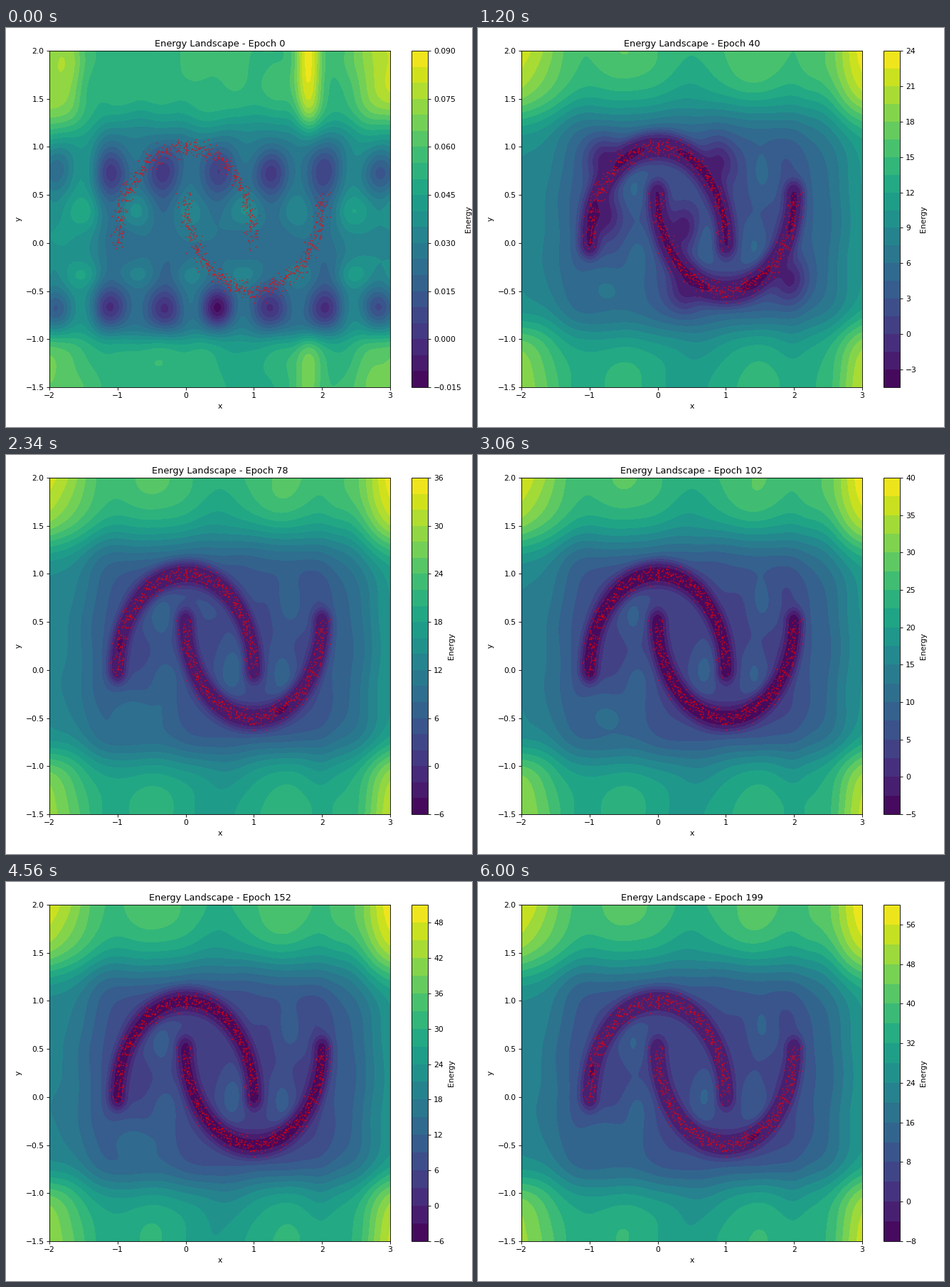
These frames come from a looping animation (655 by 562 pixels, 6.06 s). A matplotlib script:

```python
import numpy as np
import matplotlib.pyplot as plt
from matplotlib.animation import FuncAnimation

W, H, DPI = 655, 562, 72
FRAMES, STEP = 101, 60
ZOOM = 1.07  # text and line size relative to the defaults

plt.rcParams["font.family"] = "DejaVu Sans"
for key in ("font.size", "axes.linewidth", "axes.titlepad", "axes.labelpad",
            "xtick.major.size", "xtick.major.width", "xtick.major.pad",
            "ytick.major.size", "ytick.major.width", "ytick.major.pad"):
    plt.rcParams[key] *= ZOOM

# Highest energy at a few epochs
PEAK_EPOCHS = [0, 15, 40, 78, 102, 134, 170, 199]
PEAKS = [0, 7, 23.2, 35, 39.4, 47, 53.4, 59.55]

# Places that stay high, that sink early on, and the deepest spots
HILLS = [(-0.35, 0.52), (-0.3, -0.15), (0.68, 0), (1.42, 0), (1.52, 0.75)]
POOLS = [(0.38, 0.15), (-0.8, 0.88), (0.9, 0.85),
         (-0.8, 0.3), (0.4, -0.48), (1.95, -0.38)]
SPOTS = [(-0.96, 0.28), (1.4, -0.42)]


def gauss(v, spread):
    return np.exp(-(v / spread) ** 2 / 2)


def sigmoid(v):
    return 1 / (1 + np.exp(-v))


def bumps(points, height, sx, sy):
    return height * sum(gauss(X - x, sx) * gauss(Y - y, sy) for x, y in points)


def waves(seed, height, pitch, count=8):
    """Gentle irregular ripple."""
    rng = np.random.RandomState(seed)
    total = 0
    for _ in range(count):
        kx, ky = rng.normal(scale=pitch, size=2)
        total = total + np.sin(kx * X + ky * Y + rng.uniform(0, 2 * np.pi))
    return height * total / np.sqrt(count)


def arc_distance(cx, cy, side):
    """Distance to a unit half circle that opens down (1) or up (-1)."""
    dx, dy = X - cx, (Y - cy) * side
    return np.where(dy >= 0, np.abs(np.hypot(dx, dy) - 1),
                    np.hypot(np.abs(dx) - 1, dy))


def make_moons(n=1000, noise=0.05, seed=42):
    rng = np.random.RandomState(seed)
    t = np.linspace(0, np.pi, n // 2)
    pts = np.vstack([np.c_[np.cos(t), np.sin(t)],
                     np.c_[1 - np.cos(t), 0.5 - np.sin(t)]])
    order = np.arange(n)
    rng.shuffle(order)
    return pts[order] + rng.normal(scale=noise, size=pts.shape)


def start_field():
    """Untrained landscape: two rows of wells between high bands."""
    top, low = sigmoid((Y - 1.23) / 0.12), sigmoid((-0.98 - Y) / 0.07)
    well = 0.5 + 0.5 * np.cos(2 * np.pi * (X - 0.47) / 0.79)
    left, right = sigmoid((-1.3 - X) / 0.07), sigmoid((X - 2.3) / 0.1)
    z = 23 + 30 * (top + low) + (13 * left + 10 * right) * (1 - top - low)
    z -= 18 * well * gauss(Y - 0.74, 0.18)
    z -= (22 + 12 * gauss(X - 0.47, 0.35)) * well * gauss(Y + 0.68, 0.15)
    z += (1 - well) * (12 * gauss(Y - 0.33, 0.14) + 8 * gauss(Y + 0.33, 0.09))
    z += (top + 0.45 * low) * (30 * gauss(X - 1.8, 0.13)
                               + 26 * sigmoid((X - 2.6) / 0.12)
                               + 18 * sigmoid((-1.6 - X) / 0.08))
    z -= 8 * low * gauss(X - 0.8, 0.4)
    z += waves(3, 1.8, 6)
    z = (z - z.min()) / (z.max() - z.min())
    return -0.0125 + 0.1 * z


def trained_hills():
    """Bowl around the data, scaled to a height of one."""
    top, low = sigmoid((Y - 1.36) / 0.15), sigmoid((-0.88 - Y) / 0.12)
    z = 6 + 32 * top + 26 * low + 16 * sigmoid((-1.4 - X) / 0.18)
    z += 5 * sigmoid((X - 2.1) / 0.08) + 17 * sigmoid((X - 2.7) / 0.15)
    z += 3.5 * (top + low) * np.cos(2 * np.pi * (X - 1.45) / 1.9)
    z += bumps(HILLS, 6, 0.14, 0.19) + bumps([(-0.7, -0.45)], 8, 0.35, 0.18)
    z += waves(5, 0.6, 6)
    return z / z.max()


gx, gy = np.linspace(-2, 3, 120), np.linspace(-1.5, 2, 120)
X, Y = np.meshgrid(gx, gy)

first, hills = start_field(), trained_hills()
pools = bumps(POOLS, -5, 0.18, 0.17)
dist = np.minimum(arc_distance(0, 0, 1), arc_distance(1, 0.5, -1))
grain = 1 + 0.04 * np.sin(6 * X + 4 * Y + 0.6) + bumps(SPOTS, 0.11, 0.07, 0.06)


def energy(epoch):
    peak = np.interp(epoch, PEAK_EPOCHS, PEAKS)
    floor = -4.4 * (1 - np.exp(-epoch / 32)) * (1 - 0.0007 * epoch)
    width = 0.145 + 0.25 * np.exp(-epoch / 16)
    surge = (epoch / 40) ** 4
    valley = floor * grain
    plain = np.maximum(peak * hills + surge * np.exp(1 - surge) * pools, -3.6)
    rise = 1 - np.exp(-(dist / width) ** 3)
    return first + valley + (plain - valley) * rise


def box(x, y, w, h):
    return [x / W, 1 - (y + h) / H, w / W, h / H]


fig = plt.figure(figsize=(W / DPI, H / DPI), dpi=DPI)
ax = fig.add_axes(box(61, 32, 479, 474))
ax.set(xlim=(-2, 3), ylim=(-1.5, 2), xlabel="x", ylabel="y")
ax.scatter(*make_moons().T, s=1, c="red", alpha=0.5, zorder=3)
shown = []


def draw(i):
    while shown:
        shown.pop().remove()
    epoch = min(2 * i, 199)
    fill = ax.contourf(X, Y, energy(epoch), levels=20, cmap="viridis")
    cax = fig.add_axes(box(569.8, 32, 23.7, 474))
    fig.colorbar(fill, cax=cax, label="Energy")
    ax.set_title(f"Energy Landscape - Epoch {epoch}")
    shown.extend([fill, cax])


anim = FuncAnimation(fig, draw, frames=FRAMES, interval=STEP,
                     repeat=True, repeat_delay=0)
plt.show()
```
